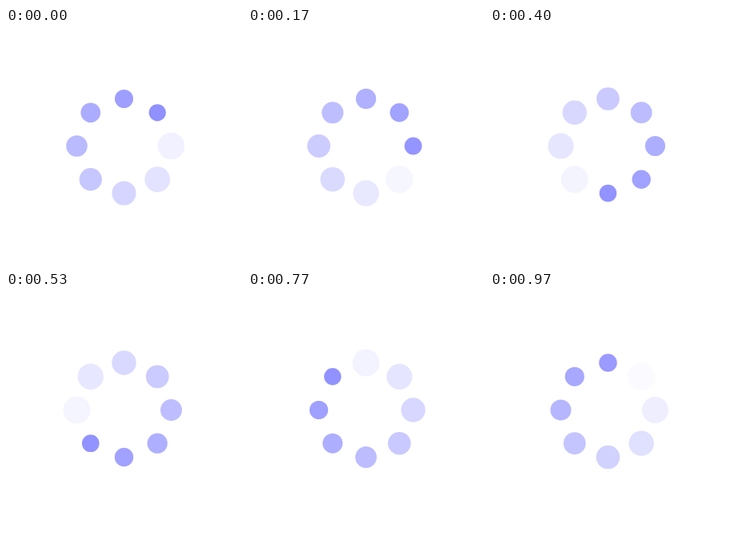
An HTML page with a canvas for the animation above (1000 ms loop, 295 by 295 pixels).

```html
<!DOCTYPE html>
<html lang="en">
<head>
<meta charset="utf-8">
<title>Loading spinner</title>
<style>
html, body { margin: 0; width: 100%; height: 100%; overflow: hidden; background: #fff; }
canvas { display: block; width: 295px; height: 295px; }
</style>
</head>
<body>
<canvas id="stage"></canvas>
<script>
const SIZE = 295, DOTS = 8, LOOP = 1000, STEPS = 30;
const MID = SIZE / 2, RING = SIZE * 0.2;
const R_MIN = SIZE * 0.036, R_MAX = SIZE * 0.06;

const canvas = document.getElementById('stage');
const ratio = window.devicePixelRatio || 1;
canvas.width = canvas.height = Math.round(SIZE * ratio);
const ctx = canvas.getContext('2d');
ctx.scale(ratio, ratio);
ctx.fillStyle = '#9090ff';

// The motion advances in 30 steps, timed to the nearest 10 ms.
function progress(ms) {
  const tick = Math.floor((ms % LOOP) / 10) * 10;
  return Math.floor((tick + 4.9) * STEPS / LOOP) / STEPS;
}

function draw(p) {
  ctx.clearRect(0, 0, SIZE, SIZE);
  for (let i = 0; i < DOTS; i++) {
    const angle = (i - 1) * 2 * Math.PI / DOTS;
    const age = (p - i / DOTS + 1) % 1;
    ctx.globalAlpha = 1 - age;
    ctx.beginPath();
    ctx.arc(MID + RING * Math.cos(angle), MID + RING * Math.sin(angle),
      R_MIN + (R_MAX - R_MIN) * age, 0, 2 * Math.PI);
    ctx.fill();
  }
}

let start = null;
function frame() {
  const now = performance.now();
  if (start === null) start = now;
  draw(progress(now - start));
  requestAnimationFrame(frame);
}
frame();
</script>
</body>
</html>
```
